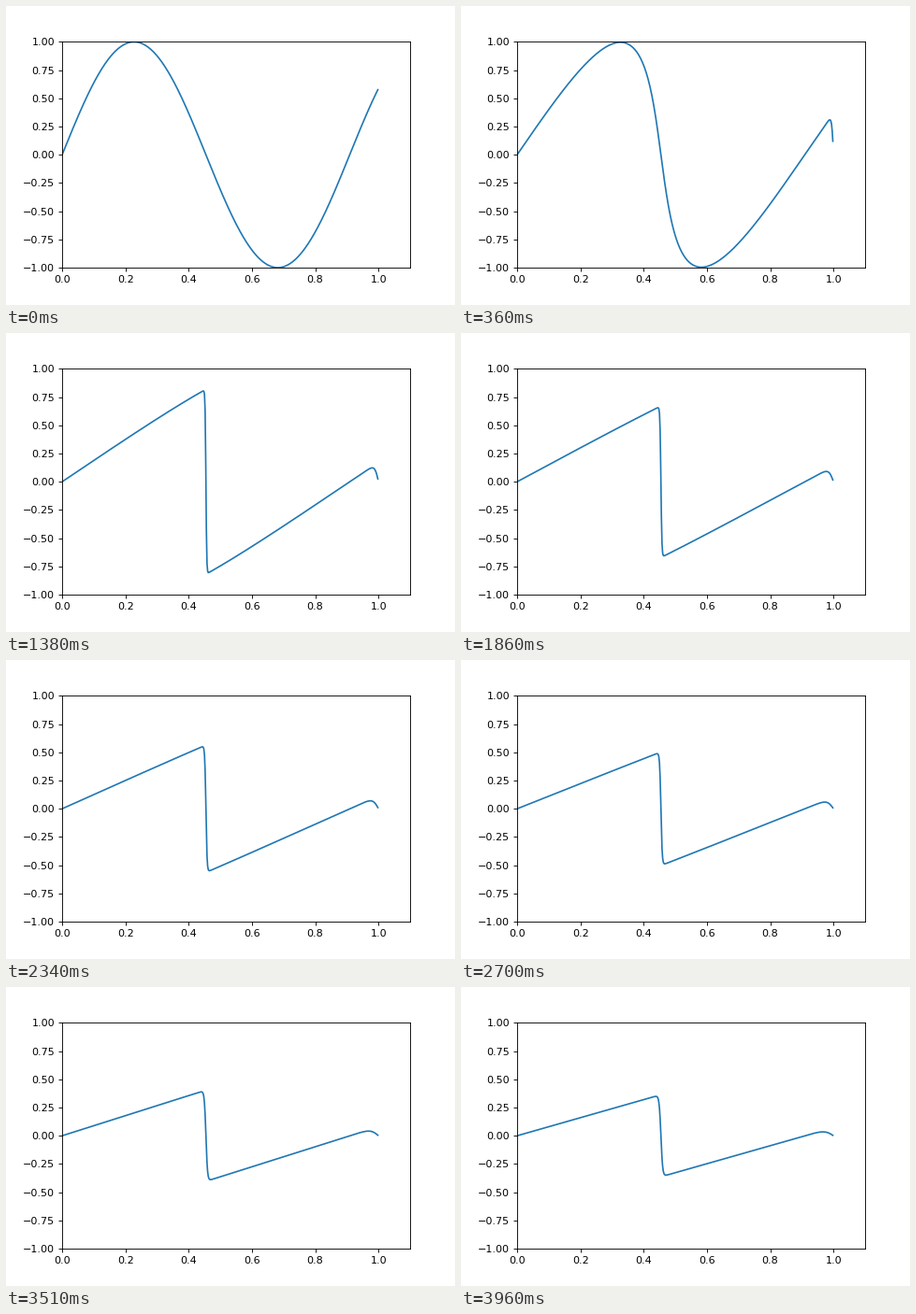
A matplotlib script that plays this animation: 480 by 320 pixels, repeating every 3990 ms.

```python
import numpy as np
import matplotlib.pyplot as plt
from matplotlib.animation import FuncAnimation

FRAMES, INTERVAL = 133, 30
NU = 0.001          # viscosity
CELLS = 1000
SUBSTEPS = 20       # solver steps per frame
DT = 1 / 120 / SUBSTEPS


def burgers_step(u, dx, dt):
    """Advance u_t + (u^2/2)_x = NU u_xx with fixed ends."""
    flux = u * u / 2
    new = u.copy()
    new[1:-1] += dt * (NU * (u[2:] - 2 * u[1:-1] + u[:-2]) / dx**2
                       - (flux[2:] - flux[:-2]) / (2 * dx))
    return new


def solve():
    x = np.linspace(0, 1, CELLS + 1)
    u = np.sin(2.2 * np.pi * x)
    u[-1] = 0
    u = burgers_step(u, x[1], DT / 4)
    history = [u]
    for _ in range(FRAMES - 1):
        for _ in range(SUBSTEPS):
            u = burgers_step(u, x[1], DT)
        history.append(u)
    # the closed right end itself is not plotted
    return x[:-1:2], np.array(history)[:, :-1:2]


x, waves = solve()

fig, ax = plt.subplots(figsize=(6, 4), dpi=80)
fig.subplots_adjust(left=0.125, right=0.9, bottom=0.125, top=0.88)
ax.set_xlim(0, 1.1)
ax.set_ylim(-1, 1)
line, = ax.plot(x, waves[0])


def update(i):
    line.set_ydata(waves[i])
    return line,


anim = FuncAnimation(fig, update, frames=FRAMES, interval=INTERVAL,
                     repeat=True, repeat_delay=0)
plt.show()
```
